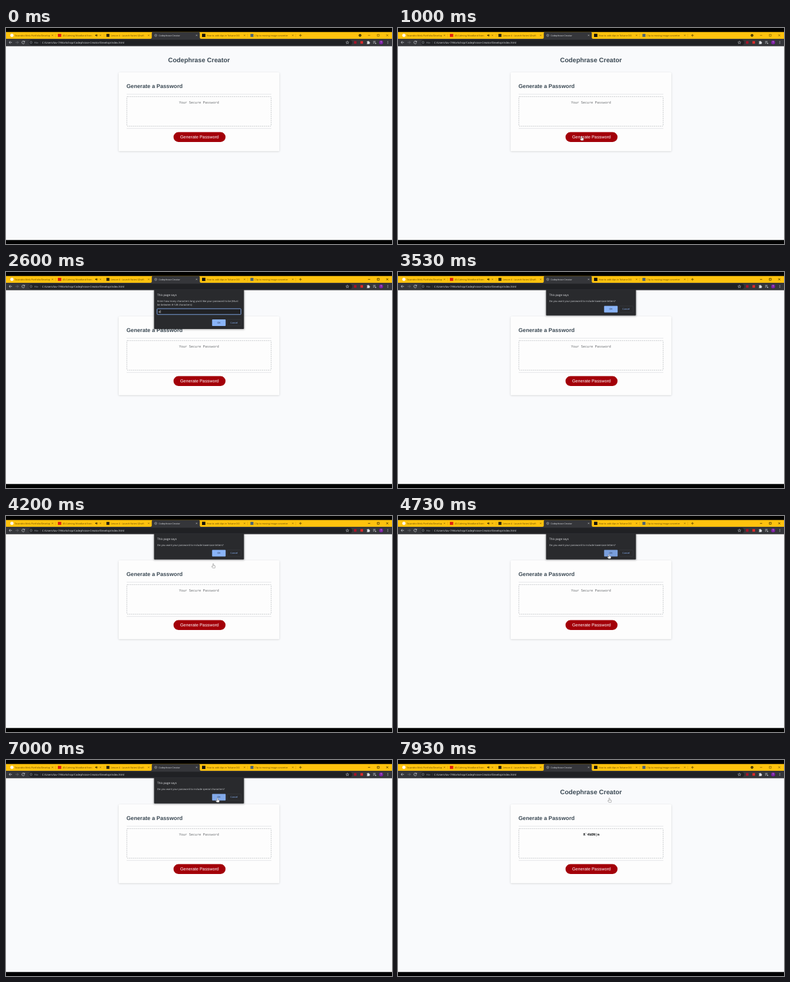
Animation, 640 px wide and 360 px high, one loop 8 s. Source, as an HTML page:

```html
<!DOCTYPE html>
<html lang="en">
<head>
<meta charset="utf-8">
<title>Codephrase Creator</title>
<style>
  html, body { margin: 0; width: 100%; height: 100%; overflow: hidden; background: #000; }
  svg { display: block; width: 100vw; height: 100vh; }
  text { font-family: "Open Sans", "Noto Sans", sans-serif; text-rendering: geometricPrecision; white-space: pre; }
  .page { font-family: "Liberation Sans", Arial, sans-serif; }
  .mono { font-family: "DejaVu Sans Mono", monospace; }
</style>
</head>
<body>
<svg id="stage" viewBox="0 0 640 360">
  <defs>
    <filter id="soft" x="-10%" y="-10%" width="120%" height="125%">
      <feGaussianBlur stdDeviation="1.6"/>
    </filter>
  </defs>
</svg>
<script>
const LOOP = 8000;
const stage = document.getElementById('stage');
const YELLOW = '#ffc20e', INK = '#5c4705', BLUE = '#8ab4f8';
const TOP = 6.67, BAR = 18, PAGE = 30.33, BOTTOM = 353.33;

function add(parent, tag, attrs, content) {
  const node = document.createElementNS('http://www.w3.org/2000/svg', tag);
  for (const key in attrs) node.setAttribute(key, attrs[key]);
  if (content !== undefined) node.textContent = content;
  parent.appendChild(node);
  return node;
}
const group = (parent = stage) => add(parent, 'g', {});
const rect = (g, x, y, width, height, fill, more) => add(g, 'rect', { x, y, width, height, fill, ...more });
const dot = (g, cx, cy, r, fill, more) => add(g, 'circle', { cx, cy, r, fill, ...more });
const line = (g, d, stroke, width = 0.6, more) =>
  add(g, 'path', { d, stroke, 'stroke-width': width, fill: 'none', ...more });
const label = (g, x, y, size, fill, str, more) =>
  add(g, 'text', { x, y, 'font-size': size, fill, ...more }, str);
const show = (node, on) => node.setAttribute('display', on ? 'inline' : 'none');
const cross = (g, x, y, r, color, width) =>
  line(g, `M${x - r} ${y - r}l${2 * r} ${2 * r}m0 ${-2 * r}l${-2 * r} ${2 * r}`, color, width);

function drawTabs(g) {
  rect(g, 0, TOP, 640, BAR - TOP, YELLOW);
  add(g, 'path', { d: `M239.500 ${BAR}Q241.700 ${BAR} 241.700 16V8.500Q241.700 ${TOP} 243.500 ${TOP}H319.500Q321.300 ${TOP} 321.300 8.500V16Q321.300 ${BAR} 323.500 ${BAR}Z`, fill: '#35363a' });
  const tabs = [
    [14.500, 'Tavandro-Melu Portfolio/Develop', 77],
    [94.200, '(8) Calming Woodland Even', 156.500],
    [173.700, 'Lesson 4 - Launch Notes! (Draft', 236.500],
    [253.200, 'Codephrase Creator', 316],
    [332.800, 'How to add clips in Tolvane DO', 395.500],
    [412.300, 'Clip to moving image converter', 475.500]
  ];
  tabs.forEach(([x, name, close], i) => {
    const active = i === 3;
    label(g, x, 13.600, 3.800, active ? '#dfe1e5' : INK, name);
    cross(g, close, 12.300, 1, active ? '#e8eaed' : '#4a3803', 0.5);
  });
  line(g, 'M82.500 9.500v6M162.500 9.500v6M400.500 9.500v6M480.500 9.500v6', '#c99708', 0.4);
  dot(g, 9.800, 12.300, 2.700, '#fff8e6');
  rect(g, 86, 9.800, 5.600, 5, '#e0200f');
  rect(g, 166.500, 9.800, 5, 5, '#2b2410');
  dot(g, 248.300, 12.300, 2, 'none', { stroke: '#a5a8ad', 'stroke-width': 0.6 });
  line(g, 'M246.500 12.300h3.600M248.300 10.500v3.600', '#a5a8ad', 0.4);
  rect(g, 325, 9.600, 5.600, 5.400, '#17150d');
  rect(g, 405.300, 9.800, 5, 5, '#4c6476');
  add(g, 'path', { d: 'M148 11.500h1.200l1.500-1.300v4.200l-1.500-1.300H148z', fill: '#3b2d02' });
  line(g, 'M151.500 11q1 1.300 0 2.600', '#3b2d02', 0.5);
  line(g, 'M486 12.300h4.400M488.200 10.100v4.400', '#4a3803', 0.7);
}

function drawToolbar(g) {
  const icon = '#dcdfe3';
  rect(g, 0, BAR, 640, PAGE - BAR, '#35363a');
  rect(g, 38, 19.500, 536, 9.300, '#202124', { rx: 4.650 });
  line(g, 'M10 24H5.200M7.300 21.800L5.100 24l2.200 2.200', icon, 0.7);
  line(g, 'M15.700 24h4.800M18.400 21.800l2.200 2.200l-2.200 2.200', '#77797d', 0.7);
  line(g, 'M30.700 23a2.300 2.300 0 1 0 .1 1.800M30.900 21.400v1.900h-1.900', icon, 0.7);
  dot(g, 41.500, 24, 1.900, 'none', { stroke: '#9aa0a6', 'stroke-width': 0.5 });
  line(g, 'M41.500 23.700v1.300M41.500 22.700v.4', '#9aa0a6', 0.5);
  label(g, 47, 25.500, 4.200, '#9aa0a6', 'File');
  line(g, 'M57 21.800v4.400', '#5f6368', 0.4);
  label(g, 59.700, 25.500, 4.430, '#e8eaed', 'C:/Users/tav-7/Workshop/Codephrase-Creator/Develop/index.html');
  add(g, 'path', { d: 'M566 21.600l.7 1.700 1.800.1-1.400 1.200.5 1.800-1.600-1-1.600 1 .5-1.800-1.400-1.200 1.800-.1z', fill: 'none', stroke: icon, 'stroke-width': 0.5 });
  rect(g, 577, 21.800, 4.200, 4.400, '#a3142a');
  rect(g, 587.600, 21.800, 4.400, 4.400, '#d82a2a');
  add(g, 'path', { d: 'M598.300 22.500h1.300a.9.900 0 0 1 1.800 0h1.300v1.300a.9.900 0 0 1 0 1.800v1.200h-4.400v-1.200a.9.900 0 0 0 0-1.800z', fill: icon });
  line(g, 'M608.700 22.200h4M608.700 23.800h4M608.700 25.400h2', icon, 0.6);
  dot(g, 612.800, 25.600, 0.9, icon);
  dot(g, 622, 24, 3.300, '#7b1fa2');
  label(g, 622, 25.400, 3.900, '#fff', 'T', { 'text-anchor': 'middle' });
  [22.200, 24, 25.800].forEach(y => dot(g, 633, y, 0.55, icon));
}

function drawControls(g, color, width) {
  line(g, 'M600.200 12.300h3.600M615.600 10.600h3.200v3.200h-3.200z', color, width);
  cross(g, 632.200, 12.200, 1.600, color, width);
}

function drawPage(g) {
  const middle = { 'text-anchor': 'middle', class: 'page' };
  const dark = '#3b4954';
  rect(g, 0, PAGE, 640, BOTTOM - PAGE, '#f9fafc');
  label(g, 320, 57.300, 10.670, dark, 'Codephrase Creator', { ...middle, 'font-weight': 700 });
  rect(g, 186.670, 74.800, 266.670, 131.200, '#000', { rx: 1.500, opacity: 0.16, filter: 'url(#soft)' });
  rect(g, 186.670, 74, 266.670, 131.300, '#fdfdfd', { rx: 1.500 });
  label(g, 199.700, 99.500, 9.170, dark, 'Generate a Password', { class: 'page', 'font-weight': 700 });
  line(g, 'M200 110.300H440M200 167.400H440', '#d3d6d9', 0.6);
  rect(g, 200.330, 114.330, 239.330, 49.330, '#fdfdfd',
    { rx: 1.200, stroke: '#a9adb1', 'stroke-width': 0.67, 'stroke-dasharray': '2 1.330' });
  rect(g, 277.700, 173.500, 86.300, 16.500, '#a30009', { rx: 8.250 });
  label(g, 320.800, 184.100, 7.270, '#fff', 'Generate Password', middle);
}

function drawDialog(lines, prompt) {
  const g = group(), h = prompt ? 65.500 : 43, top = prompt ? 79 : 56.500;
  rect(g, 244.700, 30, 150.600, h + 0.8, '#000', { rx: 1.500, opacity: 0.28, filter: 'url(#soft)' });
  rect(g, 245.500, 29.500, 149, h, '#292a2d', { rx: 1 });
  label(g, 250.800, 39.900, 4.800, '#e8eaed', 'This page says');
  lines.forEach((str, i) => label(g, 250.800, 49.600 + i * 6.500, 4.170, '#d5d8dc', str));
  const ok = rect(g, 341.700, top, 22.500, 10.900, BLUE, { rx: 1 });
  rect(g, 366.500, top + 0.2, 23.300, 10.500, 'none', { rx: 1, stroke: '#44474c', 'stroke-width': 0.4 });
  const caption = { 'text-anchor': 'middle' };
  label(g, 353, top + 6.900, 4, '#26364f', 'OK', caption);
  label(g, 378.200, top + 6.900, 4, BLUE, 'Cancel', caption);
  if (!prompt) return { g, ok };
  rect(g, 250.500, 61.200, 139, 9.600, '#202124', { rx: 1, stroke: BLUE, 'stroke-width': 0.9 });
  return {
    g, ok,
    typed: label(g, 253, 67.600, 4.200, '#e8eaed', '8'),
    caret: rect(g, 253.200, 63.700, 0.6, 4.700, '#fff')
  };
}

function drawHand() {
  const g = group();
  add(g, 'path', {
    d: 'M-.7 .2Q0-.6 .7 .2V2.800L2.800 3.300Q3.500 3.600 3.400 4.500L2.800 7.100H-.9L-2.600 4.900Q-2.800 4-2 4L-.7 4.800Z',
    fill: '#fff', stroke: '#5a5a5a', 'stroke-width': 0.45, 'stroke-linejoin': 'round'
  });
  line(g, 'M.7 3v1.200M1.800 3.200v1.200', '#888', 0.3);
  return g;
}

rect(stage, 0, 0, 640, 360, '#000');
const frame = group();
drawTabs(frame);
drawToolbar(frame);
drawPage(frame);

const idle = group(), busy = group();
drawControls(idle, INK, 0.6);
dot(idle, 587, 12.300, 2.200, '#2e2403');
add(idle, 'path', { d: 'M585.900 11.700h2.200l-1.100 1.400z', fill: YELLOW });
drawControls(busy, '#2e2403', 0.75);

const mono = { 'text-anchor': 'middle', class: 'mono' };
const hint = label(stage, 320, 125.500, 5.500, '#6a6d70', 'Your Secure Password', mono);
const result = label(stage, 320.500, 125.600, 5.550, '#15181b', 'R`4bDN|m', { ...mono, 'font-weight': 700 });

// Each dialog closes on release; the next one opens a moment later.
const FADE = 70, HOLD = 200;
const ask = what => ['Do you want your password to include ' + what];
const dialogs = [
  [1130, 2860, drawDialog(["Enter how many characters long you'd like your password to be (Must", 'be between 8-128 characters):'], true)],
  [2960, 4930, drawDialog(ask('lowercase letters?'))],
  [5030, 5730, drawDialog(ask('uppercase letters?'))],
  [5790, 6600, drawDialog(ask('numbers'))],
  [6700, 7530, drawDialog(ask('special characters?'))]
];
const { typed, caret } = dialogs[0][2];
const hand = drawHand();

// time, x, y of the fingertip
const path = [
  [200, 320, 150], [460, 304.500, 180.300], [3730, 304.500, 180.300],
  [4260, 345, 76], [4400, 345, 76], [4700, 349.800, 64], [5730, 350.500, 63.500], [8000, 350.500, 63.500]
];

function handAt(t) {
  const i = Math.max(1, path.findIndex(p => p[0] > t));
  const [t0, x0, y0] = path[i - 1], [t1, x1, y1] = path[i];
  const k = Math.min(1, Math.max(0, (t - t0) / (t1 - t0)));
  const e = k * k * (3 - 2 * k);
  return [x0 + (x1 - x0) * e, y0 + (y1 - y0) * e];
}

function draw(t) {
  const [x, y] = handAt(t);
  hand.setAttribute('transform', `translate(${x} ${y})`);
  show(hand, t >= 200 && (t < 2600 || t >= 3730));

  const overOk = t >= 4500;
  let open = false;
  dialogs.forEach(([from, to, { g, ok }]) => {
    const on = t >= from && t < to;
    open = open || on;
    show(g, on);
    g.setAttribute('opacity', Math.min(1, Math.max(0, (t - from) / FADE)));
    const pressed = overOk && t >= to - HOLD;
    ok.setAttribute('fill', pressed ? '#7a9fdc' : overOk ? '#82a9e9' : BLUE);
  });
  show(idle, !open);
  show(busy, open);

  const hasDigit = t >= 2600;
  show(typed, hasDigit);
  show(caret, t < 1860 || t >= 2400);
  caret.setAttribute('x', hasDigit ? 255.700 : 253.200);

  show(hint, t < 7600);
  show(result, t >= 7600);
}

const start = performance.now();
function tick() {
  draw((performance.now() - start) % LOOP);
  requestAnimationFrame(tick);
}
tick();
</script>
</body>
</html>
```
